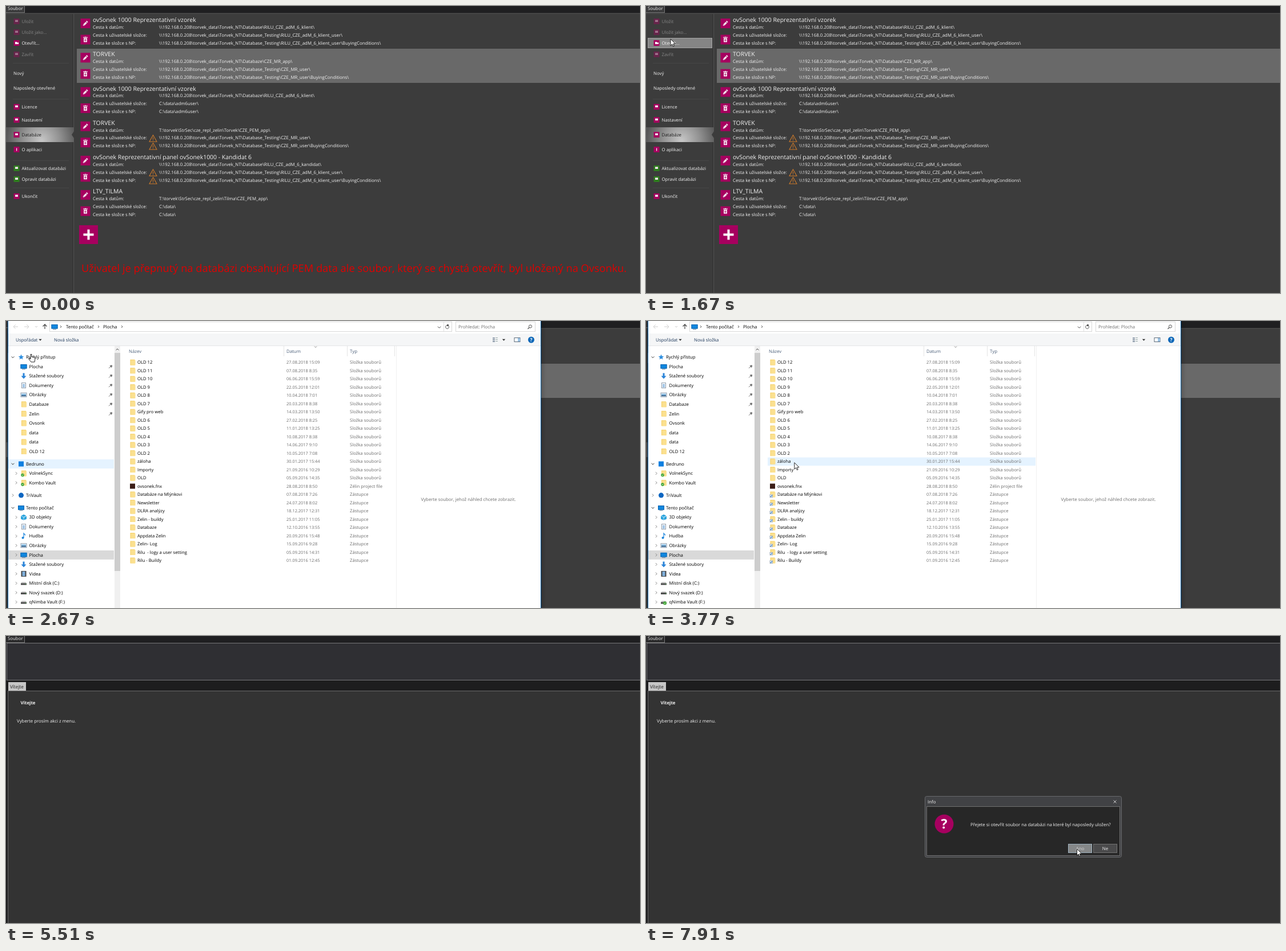
An HTML page with a canvas for the animation above (8 s loop, 1110 px wide and 504 px high).

```html
<!DOCTYPE html>
<html lang="cs">
<head>
<meta charset="utf-8">
<title>Otevření souboru</title>
<style>
html, body { margin: 0; width: 100%; height: 100%; overflow: hidden; background: #3c3c3c; }
canvas { display: block; }
</style>
</head>
<body>
<canvas id="stage" width="1110" height="504"></canvas>
<script>
const c = document.getElementById('stage').getContext('2d');
const LOOP = 8000, PINK = '#a6005f', GREEN = '#2f7d1f', BLUE = '#0f87e0', ACCENT = '#0078d7';

// drawing helpers
function rect(x, y, w, h, fill, stroke) {
  if (fill) { c.fillStyle = fill; c.fillRect(x, y, w, h); }
  if (stroke) { c.strokeStyle = stroke; c.lineWidth = 1; c.strokeRect(x + .5, y + .5, w - 1, h - 1); }
}
function text(str, x, y, color = '#f2f2f2', size = 7.85, align = 'left', weight = 400) {
  c.font = `${weight} ${size}px "Open Sans", "Noto Sans", sans-serif`;
  c.textAlign = align;
  c.fillStyle = color;
  c.fillText(str, x, y + size * .35);
}
function poly(pts, stroke, width = 1, fill) {
  c.beginPath();
  for (let i = 0; i < pts.length; i += 2) c.lineTo(pts[i], pts[i + 1]);
  if (fill) { c.closePath(); c.fillStyle = fill; c.fill(); }
  if (stroke) { c.strokeStyle = stroke; c.lineWidth = width; c.stroke(); }
}
function disc(x, y, r, fill) {
  c.beginPath(); c.arc(x, y, r, 0, 7); c.fillStyle = fill; c.fill();
}
function ring(x, y, r, color, width, from = 0, to = 2 * Math.PI) {
  c.beginPath(); c.arc(x, y, r, from, to);
  c.strokeStyle = color; c.lineWidth = width; c.stroke();
}
function at(x, y, draw, scale = 1, turn = 0) {
  c.save(); c.translate(x, y); c.scale(scale, scale); c.rotate(turn); draw(); c.restore();
}
function faded(alpha, draw) {
  c.save(); c.globalAlpha *= alpha; draw(); c.restore();
}
function chevron(x, y, dir, color = '#555', r = 2) {
  at(x, y, () => poly([-r / 2, -r, r / 2, 0, -r / 2, r], color), 1, dir * Math.PI / 2);
}

// timing helpers: n equal jumps, the first at a, the last at b
function steps(t, a, b, n) {
  return t < a ? 0 : Math.min(n, Math.floor((t - a) / (b - a) * (n - 1) + 1e-6) + 1) / n;
}
const ease = p => p * p * (3 - 2 * p);
const mix = (a, b, p) => a + (b - a) * p;

// backstage menu
const NET = '\\\\192.168.0.208\\torvek_data\\Torvek_NT\\Databa';
const TEST = NET + 'se_Testing\\', LOCAL = 'T:\\torvek\\StrSec\\cze_repl_zelin\\';
const kiosk = TEST + 'RILU_CZE_adM_6_klient_user\\', region = TEST + 'CZE_MR_user\\', BUY = 'BuyingConditions\\';
const databases = [
  ['ovSonek 1000 Reprezentativní vzorek', NET + 'se\\RILU_CZE_adM_6_klient\\', kiosk, kiosk + BUY],
  ['TORVEK', NET + 'ze\\CZE_MR_app\\', region, region + BUY],
  ['ovSonek 1000 Reprezentativní vzorek', NET + 'ze\\RILU_CZE_adM_6_klient\\', 'C:\\data\\adm6user\\', 'C:\\data\\adm6user\\'],
  ['TORVEK', LOCAL + 'Torvek\\CZE_PEM_app\\', region, region + BUY, 1],
  ['ovSonek Reprezentativní panel ovSonek1000 - Kandidat 6', NET + 'se\\RILU_CZE_adM_6_kandidat\\', kiosk, kiosk + BUY, 1],
  ['LTV_TILMA', LOCAL + 'Tilma\\CZE_PEM_app\\', 'C:\\data\\', 'C:\\data\\'],
];
const labels = ['Cesta k datům:', 'Cesta k uživatelské složce:', 'Cesta ke složce s NP:'];
// label, y, icon colour, disabled
const menu = [
  ['Uložit', 27, PINK, 1], ['Uložit jako...', 46, PINK, 1], ['Otevřít...', 65, PINK], ['Zavřít', 85, PINK, 1],
  ['Nový', 118], ['Naposledy otevřené', 144],
  ['Licence', 177, PINK], ['Nastavení', 200, PINK], ['Databáze', 226, PINK], ['O aplikaci', 252, PINK],
  ['Aktualizovat databázi', 285, GREEN], ['Opravit databázi', 304, GREEN], ['Ukončit', 334, PINK],
];

function appTab(fill) {
  rect(0, 0, 1110, 13, '#1f1f21');
  rect(-1, -2, 34, 14, fill, '#777');
  text('Soubor', 3, 4.5);
}
function pencil() {
  rect(-8.5, -8.5, 17, 17, PINK);
  c.rotate(-Math.PI / 4);
  rect(-3.6, -1.6, 6, 3.2, '#f4e4ee');
  rect(3, -1.6, 2, 3.2, '#f4e4ee');
  poly([-4, -1.6, -6, 0, -4, 1.6], null, 1, '#f4e4ee');
}
function trash() {
  rect(-8.5, -8.5, 17, 17, PINK);
  rect(-3, -2.6, 6, 7, '#f4e4ee');
  rect(-4, -4.5, 8, 1.2, '#f4e4ee');
  rect(-1.2, -5.2, 2.4, 1, '#f4e4ee');
  ring(0, 1, 1.2, PINK, .9);
}
function warning(x, y) {
  poly([x, y - 6, x + 6.5, y + 5.5, x - 6.5, y + 5.5, x, y - 6, x + 1, y - 4], '#c9782b', 1.1);
  rect(x - .5, y - 2, 1, 4, '#c9782b');
  rect(x - .5, y + 3, 1, 1, '#c9782b');
}
function backstage(t) {
  rect(0, 0, 1110, 504, '#3c3c3c');
  appTab('#3a3a3b');
  rect(0, 12.5, 1110, 1, '#5a5a5a');
  rect(117, 14, 1, 490, '#2b2b2b');
  rect(118, 14, 1, 490, '#585858');
  for (const y of [100, 163, 271, 319]) rect(12, y, 98, 1, '#474747');

  const glow = c.createRadialGradient(62, 236, 2, 62, 236, 62);
  glow.addColorStop(0, '#c4c4c4');
  glow.addColorStop(.5, '#929292');
  glow.addColorStop(1, '#565656');
  rect(0, 213, 119, 26, glow);
  poly([119, 220, 115, 226, 119, 232], null, 1, '#3c3c3c');

  if (t >= 1566) rect(3, 56, 113, 18, '#858585', '#a3a3a3');
  for (const [label, y, color, off] of menu) {
    if (color) faded(off ? .4 : 1, () => {
      rect(13.5, y - 5, 10, 10, color);
      if (label === 'O aplikaci') rect(18, y - 2.5, 1.2, 5, '#fff');
      else if (label === 'Otevřít...') { rect(16, y - 2, 3, 1, '#fff'); rect(16, y - 1, 6, 3, '#fff'); }
      else rect(16, y - 2.5, 5, 3.5, '#f4e4ee');
    });
    const ink = off ? '#858585' : label === 'Databáze' ? '#1c1c1c' : '#f2f2f2';
    text(label, color ? 27.5 : 13, y, ink);
  }

  rect(124, 75, 986, 60, '#696969');
  databases.forEach(([name, ...rest], i) => {
    const y = 24.5 + 60.25 * i;
    at(139, y + 6, pencil);
    at(139, y + 34.5, trash);
    text(name, 152, y, '#f2f2f2', 10.45);
    labels.forEach((label, k) => {
      const row = y + 12.7 + 13.8 * k;
      text(label, 152, row);
      text(rest[k], 268, row);
      if (rest[3] && k) warning(257.5, row + 1);
    });
  });
  rect(128, 385, 33, 33, PINK);
  rect(135.5, 399.5, 18, 4, '#fff');
  rect(142.5, 392.5, 4, 18, '#fff');

  faded(1 - steps(t, 500, 670, 3), () => text(
    'Uživatel je přepnutý na databázi obsahující PEM data ale soubor, který se chystá otevřít, byl uložený na Ovsonku.',
    132, 461, '#e00000', 18.3));
}

// file picker
// gap before, indent, label, icon, pinned, chevron direction (0 right, 1 down)
const nav = [
  [0, 0, 'Rychlý přístup', 'star', 0, 1],
  [0, 1, 'Plocha', 'screen', 1], [0, 1, 'Stažené soubory', 'down', 1], [0, 1, 'Dokumenty', 'doc', 1],
  [0, 1, 'Obrázky', 'image', 1], [0, 1, 'Databaze', 'folder', 1], [0, 1, 'Zelin', 'folder', 1],
  [0, 1, 'Ovsonk', 'folder'], [0, 1, 'data', 'folder'], [0, 1, 'data', 'folder'], [0, 1, 'OLD 12', 'folder'],
  [1, 0, 'Bedruno', 'square', 0, 1], [0, 1, 'VolnekSync', 'synced', 0, 0], [0, 1, 'Kombo Vault', 'synced', 0, 0],
  [1, 0, 'TriVault', 'circle', 0, 0],
  [1, 0, 'Tento počítač', 'screen', 0, 1], [0, 1, '3D objekty', 'cube', 0, 0], [0, 1, 'Dokumenty', 'doc', 0, 0],
  [0, 1, 'Hudba', 'note', 0, 0], [0, 1, 'Obrázky', 'image', 0, 0], [0, 1, 'Plocha', 'screen', 0, 0],
  [0, 1, 'Stažené soubory', 'down', 0, 0], [0, 1, 'Videa', 'film', 0, 0], [0, 1, 'Místní disk (C:)', 'drive', 0, 0],
  [0, 1, 'Nový svazek (D:)', 'drive', 0, 0], [0, 1, 'qNimba Vault (F:)', 'drive', 0, 0],
];
const files = `OLD 12|27.08.2018 15:09
OLD 11|07.08.2018 8:35
OLD 10|06.06.2018 15:59
OLD 9|22.05.2018 12:01
OLD 8|10.04.2018 7:01
OLD 7|20.03.2018 8:38
Gify pro web|14.03.2018 13:50
OLD 6|27.02.2018 8:25
OLD 5|11.01.2018 13:25
OLD 4|10.08.2017 8:38
OLD 3|14.06.2017 9:10
OLD 2|10.05.2017 7:08
záloha|30.01.2017 15:44
Importy|21.09.2016 10:29
OLD|05.09.2016 14:35
ovsonek.fnx|28.08.2018 8:50
Databáze na Mlýnkovi|07.08.2018 7:26
Newsletter|24.07.2018 8:02
DLRA analýzy|18.12.2017 12:31
Zelin - buildy|25.01.2017 11:05
Databaze|12.10.2016 13:55
Appdata Zelin|20.09.2016 15:48
Zelin- Log|15.09.2016 9:28
Rilu  - logy a user setting|05.09.2016 14:31
Rilu - Buildy|01.09.2016 12:45`.split('\n').map(line => line.split('|'));
const PROJECT = 15;

const icons = {
  folder() { rect(-4, -5, 8, 10, '#f5cf67'); rect(-3, -4, 8, 9, '#fbe08f'); },
  synced() { icons.folder(); disc(-2, 3, 2.8, '#3fa535'); poly([-3.4, 3, -2.4, 4, -.7, 2], '#fff', .8); },
  screen() { rect(-5.5, -4, 11, 7.5, BLUE, '#0a62ad'); rect(-3, 4.2, 6, 1, '#6b87a0'); },
  down() { poly([-1.5, -5, 1.5, -5, 1.5, 0, 4.5, 0, 0, 5, -4.5, 0, -1.5, 0], null, 1, '#2b84d8'); },
  doc() { rect(-4, -5, 8, 10, '#fff', '#8a98a8'); for (const y of [-2, 0, 2]) rect(-2, y, 4, 1, '#4a90d0'); },
  image() { rect(-5.5, -4, 11, 8, '#fff', '#8a98a8'); rect(-4, -2, 8, 2, '#8cc6f0'); rect(-4, 0, 8, 2.5, '#3f6f98'); },
  star() {
    const pts = [];
    for (let i = 0; i < 10; i++) pts.push(Math.sin(i * .628) * (i % 2 ? 2.3 : 5), -Math.cos(i * .628) * (i % 2 ? 2.3 : 5));
    poly(pts, null, 1, '#2f8fdf');
  },
  square() { rect(-4.5, -4.5, 9, 9, '#0d7fe0'); },
  circle() { disc(0, 0, 4.5, '#0d66c2'); },
  cube() { poly([0, -5, 5, -2.5, 5, 3, 0, 5, -5, 3, -5, -2.5], null, 1, '#2ba3dc'); poly([-5, -2.5, 0, 0, 5, -2.5, 0, 0, 0, 5], '#d8f1fb', .8); },
  note() { disc(-1.5, 3, 2, '#1f86dc'); poly([0, 3, 0, -5, 3, -1.5], '#1f86dc', 1.2); },
  film() { rect(-4.5, -5, 9, 10, '#444'); rect(-2.5, -4, 5, 8, '#7fb0dc'); },
  drive() { poly([-5, 0, -3.5, -2, 3.5, -2, 5, 0], null, 1, '#c4c4c4'); rect(-5, 0, 10, 3, '#4c4c4c'); rect(3, 1, 1, 1, '#5be05b'); },
  project() { rect(-4.5, -4.5, 9, 9, '#3a1d17'); },
};

function navPane(t) {
  let y = 63.5;
  nav.forEach(([gap, indent, label, icon, pinned, dir], i) => {
    if (i) y += gap ? 22 : 16.55;
    if (t < 3120 && label === 'Bedruno') rect(4, y - 8, 185, 16, '#e5f3ff');
    if (i === 20) rect(4, y - 8, 185, 16, '#d9d9d9');
    at((indent ? 31 : 26.5), y, icons[icon]);
    if (i === 25 && t >= 2790) { disc(33, y + 2, 3, '#3fa535'); poly([31.5, y + 2, 32.6, y + 3, 34.5, y + 1], '#fff', .8); }
    text(label, indent ? 40.5 : 35, y, '#000');
    if (pinned) { poly([180, y + 3, 183, y], '#777', 1); poly([182, y - 2, 185, y + 1.5], '#777', 1.2); rect(183, y - 2.5, 3, 3, '#777'); }
    if (dir >= 0) faded(1 - steps(t, 3980, 4320, 4), () => chevron(indent ? 18 : 12, y, dir, dir ? '#333' : '#888', 2.4));
  });
}
function fileList(t, pointer) {
  const top = i => 72.7 + 14.49 * i;
  const hover = pointer && pointer.x > 213 ? Math.round((pointer.y - 72.7) / 14.49) : -1;
  files.forEach(([name, date], i) => {
    const y = top(i), picked = i === PROJECT && t >= 3880;
    if (picked) rect(213, y - 7, 469, 14.5, t < 5090 ? '#cce8ff' : '#d9d9d9');
    else if (i === hover && t >= 3120) rect(213, y - 7, 469, 14.5, '#e5f3ff');
    at(221.5, y, icons[i === PROJECT ? 'project' : 'folder']);
    if (i > PROJECT && t >= 2790) {
      rect(216.5, y, 5.5, 5.5, '#fff', '#9ab');
      poly([218, y + 4.4, 220.6, y + 1.6], '#1a6fc4', 1.2);
    }
    text(name, 230, y, '#000', 7.7);
    text(date, 491, y, '#6d6d6d', 7.4);
    text(i < PROJECT ? 'Složka souborů' : i > PROJECT ? 'Zástupce' : 'Zélin project file', 602, y, '#6d6d6d', 7.7);
  });
}
function pickerBars() {
  // address row
  poly([21, 10, 13, 10, 16.5, 6.5, 13, 10, 16.5, 13.5], '#d0d0d0');
  poly([32, 10, 40, 10, 36.5, 6.5, 40, 10, 36.5, 13.5], '#d0d0d0');
  chevron(53, 10, 1, '#ccc');
  poly([68, 14, 68, 6, 64.5, 9.5, 68, 6, 71.5, 9.5], '#444', 1.2);
  rect(76, 1, 705, 18, '#fff', '#d9d9d9');
  at(85, 10, icons.screen);
  text('Tento počítač', 105, 10, '#000');
  text('Plocha', 170, 10, '#000');
  for (const x of [96, 162, 203]) chevron(x, 10, 0);
  chevron(758.5, 11, 1, '#444', 2.6);
  rect(766, 2, 1, 16, '#e0e0e0');
  ring(772.5, 10.5, 3, '#555', 1, -.8, 4.6);
  rect(772, 6, 3, 3, '#555');
  rect(787, 1, 140, 18, '#fff', '#d9d9d9');
  text('Prohledat: Plocha', 792, 10.5, '#6d6d6d');
  ring(918, 9.5, 2.6, '#555', 1);
  poly([916, 11.5, 913.5, 14], '#555', 1.3);
  // command row
  rect(4, 22, 932, 21, '#f5f6f7');
  rect(4, 43, 932, 1, '#e4e5e7');
  text('Uspořádat', 17, 33, '#1e395b');
  text('Nová složka', 84, 33, '#1e395b');
  for (const x of [60, 871.5]) poly([x - 2.7, 31.8, x + 2.7, 31.8, x, 34.8], null, 1, '#333');
  for (const y of [29, 32, 35]) { rect(852, y, 4, 2, '#8a98a8'); rect(857, y, 4, 1, '#9aa'); }
  rect(889.5, 29, 11, 8, '#fff', '#5a6a7a');
  rect(896, 30, 4, 6, '#9cc4e6');
  disc(919.5, 33, 5.5, '#0e68b8');
  text('?', 919.5, 33, '#fff', 8.5, 'center', 700);
  // column heads
  text('Název', 215, 53, '#4c607a');
  text('Datum', 491, 53, '#4c607a');
  text('Typ', 602, 53, '#4c607a');
  for (const x of [486, 597, 680]) rect(x, 44, 1, 18, '#e5e5e5');
  chevron(542, 45.5, 1, '#888');
}
function picker(t, pointer) {
  const opening = t < 2570, blank = t < 2670;
  c.save();
  c.globalAlpha = opening ? .51 : blank ? .92 : 1;
  c.translate(470, 290);
  if (opening) c.scale(.975, .975);
  c.translate(-470, -290);
  c.shadowColor = 'rgba(0,0,0,.45)';
  c.shadowBlur = blank ? 0 : 10;
  rect(4, -1, 932, 660, '#fff');
  c.shadowBlur = 0;
  rect(3, -40, 934, 39, ACCENT);
  for (const x of [3.3, 936]) rect(x, -1, .7, 660, ACCENT);
  rect(190, 44, 10, 470, opening ? '#909090' : '#f0f0f0');
  if (blank) rect(190, 187, 10, 330, opening ? '#616161' : '#cdcdcd');
  else rect(190, 56, 10, 383, '#cdcdcd');
  chevron(195, 50, 3, '#444', 2.4);
  if (!blank) {
    pickerBars();
    navPane(t);
    rect(683, 44, 1, 460, '#f0f0f0');
    fileList(t, pointer);
    text(t < 3880 ? 'Vyberte soubor, jehož náhled chcete zobrazit.' : 'Náhled není k dispozici.', 809.5, 313.5, '#6d6d6d', 7.85, 'center');
  }
  c.restore();
}

// welcome page
function button(label, x, hot) {
  rect(x, 365, 42, 16, hot ? '#858788' : '#4a4a4b', hot ? '#9db0bd' : '#727272');
  text(label, x + 21, 373.5, hot ? '#d8d8d8' : '#f2f2f2', 7.85, 'center');
}
function question(t) {
  c.beginPath();
  c.roundRect(488.5, 281.5, 344, 107, 3);
  c.fillStyle = '#414245'; c.fill();
  c.strokeStyle = '#68696c'; c.lineWidth = 1; c.stroke();
  rect(491, 299, 339, 87, '#272727', '#707070');
  text('Info', 493, 291);
  poly([818.5, 288.5, 823.5, 293.5], '#ccc');
  poly([823.5, 288.5, 818.5, 293.5], '#ccc');
  disc(522, 330, 16.5, PINK);
  text('?', 522, 330, '#fff', 23, 'center', 700);
  text('Přejete si otevřít soubor na databázi na které byl naposledy uložen?', 568, 331);
  button('Ano', 739, t >= 7800);
  button('Ne', 783, false);
}
function welcome(t) {
  const shown = steps(t, 6610, 6930, 4);
  const dim = Math.min(1, steps(t, 5710, 6510, 9) * 3) * Math.min(1, (1 - shown) / .75);
  rect(0, 0, 1110, 504, '#1d1d1e');
  appTab('#2a2a2b');
  rect(1, 12, 1112, 66, '#2f2f33', '#77777a');
  rect(3, 96, 1112, 420, '#333', '#6a6a6a');
  faded(1 - .6 * dim, () => {
    rect(4, 81, 31, 15, '#c6c6c6');
    text('Vítejte', 7, 89.5, '#222', 8.1);
  });
  text('Vítejte', 25.5, 117, '#f2f2f2', 7.85, 'left', 700);
  text('Vyberte prosím akci z menu.', 19, 149);
  rect(0, 0, 1110, 504, `rgba(0,0,0,${.34 * dim})`);
  if (shown) faded(Math.min(1, shown * 1.3), () =>
    at(660.5, 335, () => { c.translate(-660.5, -335); question(t); }, .933 + .067 * shown));
  faded(dim, () => {
    const turn = Math.floor((t - 6610) / 100) * Math.PI / 4;
    ring(661, 325.5, 12, '#6c6c6c', 4.5);
    ring(661, 325.5, 12, '#b8b8b8', 4, turn - 1.7, turn + 1);
  });
}

// pointer
function pointerAt(t) {
  const move = (x0, y0, x1, y1, p) => ({ x: mix(x0, x1, ease(p)), y: mix(y0, y1, ease(p)) });
  if (t < 820 || (t >= 5090 && t < 5710)) return null;
  if (t < 1010) return { x: 315, y: 297 };
  if (t < 2450) return move(408, 315, 43, 58, steps(t, 1150, 1670, 6));
  if (t < 3120) return { x: 43, y: 58, hand: true };
  if (t < 5090) return move(43, 58, 300, 284, steps(t, 3120, 3880, 8));
  return move(1021, 472.5, 754.5, 374, steps(t, 7260, 7910, 7));
}
function drawPointer({ x, y, hand }) {
  at(x, y, () => poly(hand
    ? [0, .5, 2, .5, 2, 5, 7, 6, 8, 8, 7, 14, 1, 14, -3, 9, -2.5, 7.5, 0, 9, 0, .5]
    : [0, 0, 0, 11.5, 2.7, 9, 4.5, 13, 6.3, 12.2, 4.6, 8.4, 8.2, 8.2, 0, 0], '#111', .9, '#fff'));
}

function draw(t) {
  const pointer = pointerAt(t);
  c.setTransform(1, 0, 0, 1, 0, 0);
  c.textRendering = 'geometricPrecision';
  if (t < 5510) backstage(t); else welcome(t);
  if (t >= 2450 && t < 5510) picker(t, pointer);
  if (pointer) drawPointer(pointer);
}
const start = performance.now();
function tick() {
  draw((performance.now() - start) % LOOP);
  requestAnimationFrame(tick);
}
tick();
</script>
</body>
</html>
```
